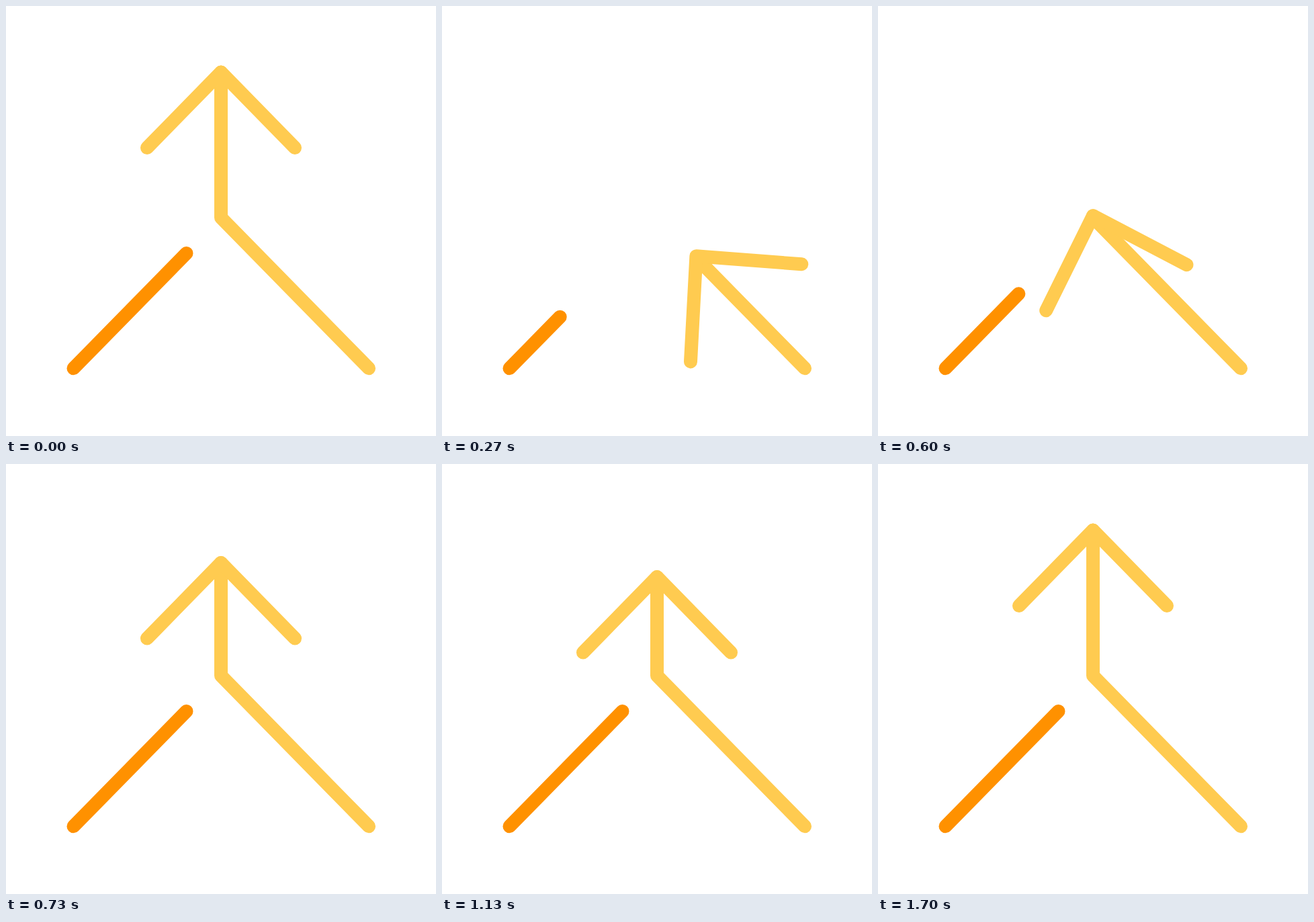
Animation, 640 px wide and 640 px high, one loop 2 s. Source, as an HTML page:

```html
<!DOCTYPE html>
<html lang="en">
<head>
<meta charset="utf-8">
<title>Merge arrow</title>
<style>
  html, body { margin: 0; height: 100%; overflow: hidden; background: #fff; }
  svg { display: block; width: 100%; height: 100%; }
  path { fill: none; stroke: #ffcb50; stroke-width: 20; stroke-linecap: round; stroke-linejoin: round; }
  #branch { stroke: #ff9100; }
</style>
</head>
<body>
<svg viewBox="0 0 640 640">
  <path id="branch" d="M100.5 539.3L268.5 368"/>
  <path id="stem" d="M540 539.3L320 315V98.5"/>
  <path id="head" d="M-110 112.5L0 0L110 112.5"/>
</svg>
<script>
  const LOOP = 2000, FPS = 30;
  const [branch, stem, head] = ['branch', 'stem', 'head'].map(id => document.getElementById(id));
  const branchLength = branch.getTotalLength();
  const stemLength = stem.getTotalLength();

  // Smooth rise from 0 to 1 between two ticks.
  function ease(tick, from, to) {
    const u = Math.min(1, Math.max(0, (tick - from) / (to - from)));
    return u * u * (3 - 2 * u);
  }

  // Out and back again: 0 to 1 to 0.
  const swing = (tick, out, outEnd, back, backEnd) =>
    ease(tick, out, outEnd) - ease(tick, back, backEnd);

  const trim = (path, length) => path.setAttribute('stroke-dasharray', `${length} 2000`);

  function draw() {
    const time = performance.now() % LOOP;
    const tick = Math.floor(time * FPS / 1000 + 0.12);

    // The arrow pulls back along its stem, returns, then dips once more.
    const back = 432 * swing(tick, 0, 12.7, 11, 24.9) + 72 * swing(tick, 25, 32, 32, 50);
    const turn = -45 * swing(tick, 1, 9.5, 12.9, 21.9);
    const drift = 6 * swing(tick, 5, 14, 14, 18);
    const reach = 1 - 0.8 * swing(tick, 0, 12.7, 13.3, 22);

    const tip = stem.getPointAtLength(stemLength - back);
    trim(branch, branchLength * reach);
    trim(stem, stemLength - back - drift * 1.6);
    head.setAttribute('transform',
      `translate(${tip.x + drift * 0.71} ${tip.y - drift * 0.7}) rotate(${turn})`);
    requestAnimationFrame(draw);
  }
  draw();
</script>
</body>
</html>
```
